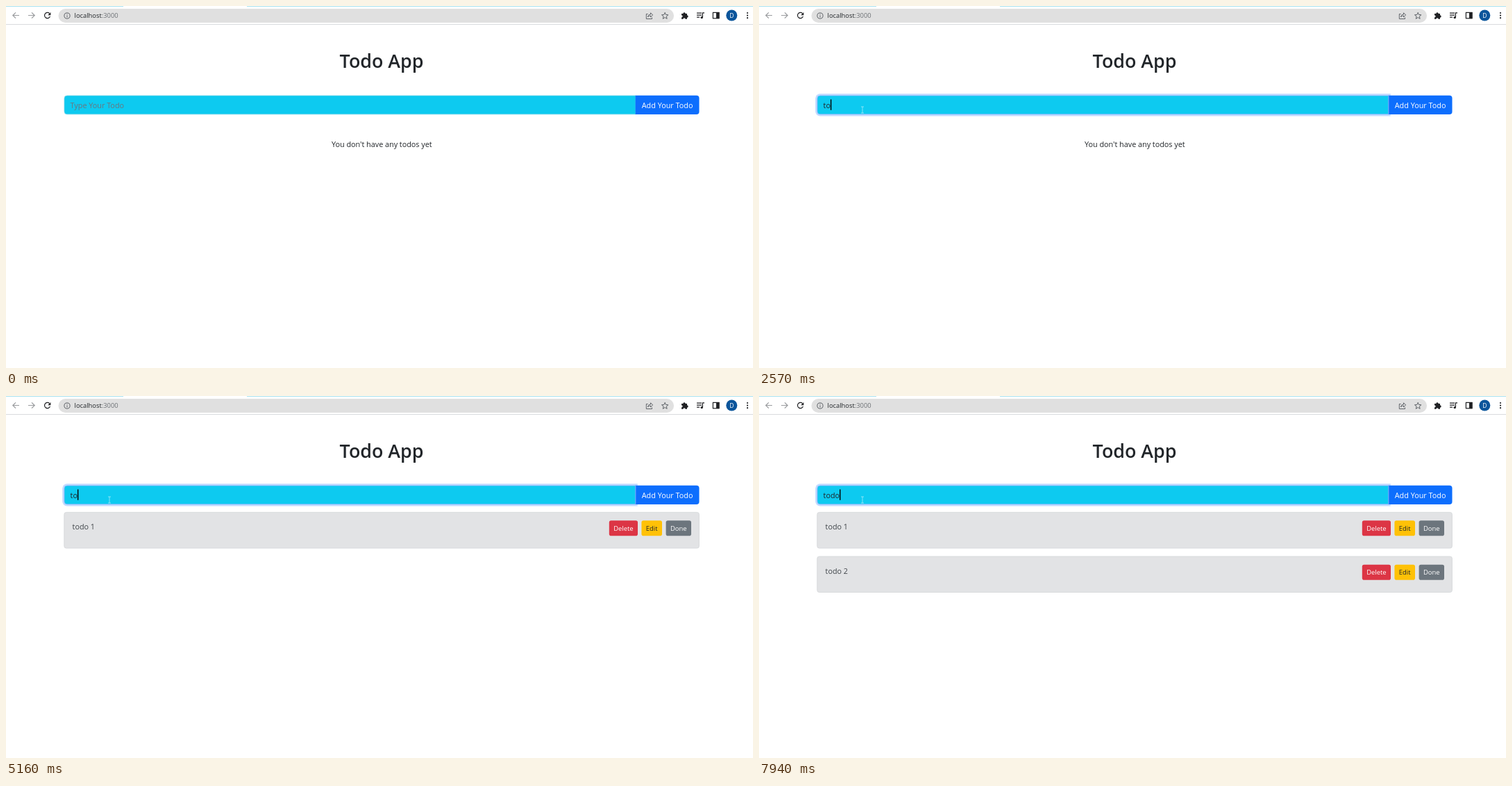
An HTML page for the animation above (8 s loop, 1076x521 px).

```html
<!DOCTYPE html>
<html lang="en">
<head>
<meta charset="utf-8">
<title>Todo App</title>
<style>
  html, body { margin: 0; width: 100%; height: 100%; overflow: hidden; background: #fff; }
  svg { display: block; width: 1076px; height: 521px; }
  text { font: 10.8px "Open Sans", "Noto Sans", sans-serif; fill: #212529; white-space: pre; }
  .mid { text-anchor: middle; }
  .title { font-size: 26.8px; font-weight: 600; }
  .url { font-size: 9.35px; }
  .small { font-size: 9.45px; }
  .white { fill: #fff; }
  .line { fill: none; stroke: #202124; stroke-width: 1.2; }
  .grey { stroke: #9a9c9f; }
  .thin { stroke: #5f6368; stroke-width: 1; }
</style>
</head>
<body>
<svg viewBox="0 0 1076 521">
  <!-- browser bar -->
  <path d="M0 0H169V1H0ZM347 0H1076V1H347Z" fill="#a9e2f1"/>
  <rect y="26" width="1076" height="1" fill="#d9dbde"/>
  <rect x="75.5" y="4" width="886.5" height="20" rx="10" fill="#e0e0e0"/>
  <path class="line grey" d="M19 13.5H10M14 9.3L9.8 13.5L14 17.7M32 13.5H41M37 9.3L41.2 13.5L37 17.7"/>
  <path class="line" stroke-width="1.4" d="M62.6 10.7A4.1 4.1 0 1 0 63.5 14.9"/>
  <path d="M64.4 9V13.2H60.2Z" fill="#202124"/>
  <circle class="line thin" cx="88" cy="14" r="4.1"/>
  <path class="line thin" d="M88 13.4V16.4M88 11.4V12.4"/>
  <text class="url" x="98.6" y="17.4">localhost<tspan fill="#6b6f74">:3000</tspan></text>
  <path class="line thin" d="M924.5 11.5H922.3V18.5H930.5V16.5M924.5 16C924.8 13.2 926.4 12 928.5 12V9.8L931.7 13L928.5 16V14C926.7 14 925.5 14.6 924.5 16Z"/>
  <path class="line thin" id="star"/>
  <path d="M973 11H975.3A1.7 1.7 0 0 1 978.7 11H981V13.3A1.7 1.7 0 0 1 981 16.7V18.8H978.6A1.6 1.6 0 0 0 975.4 18.8H973V16.4A1.6 1.6 0 0 0 973 13.2Z" fill="#202124"/>
  <path class="line" d="M995 10.2H1002M995 13.2H1002M995 16.2H999M1003.4 16.6V9.9H1006"/>
  <circle cx="1002.2" cy="16.6" r="1.7" fill="#202124"/>
  <rect class="line" x="1018.4" y="9.4" width="8.6" height="8.4"/>
  <rect x="1023" y="9" width="4.5" height="9" fill="#202124"/>
  <circle cx="1045.3" cy="13.5" r="8" fill="#0b559b"/>
  <text class="mid white" x="1045.3" y="16.6" style="font-size:8.5px">D</text>
  <g fill="#202124">
    <circle cx="1068" cy="10" r="1.1"/><circle cx="1068" cy="13.6" r="1.1"/><circle cx="1068" cy="17.2" r="1.1"/>
  </g>

  <!-- page -->
  <text class="mid title" x="541" y="89">Todo App</text>
  <path id="glow" fill="#0d6efd" fill-opacity=".25"/>
  <path id="field" fill="#0dcaf0" stroke-width=".8"/>
  <path d="M906.6 128.8H994.5A4 4 0 0 1 998.5 132.8V152A4 4 0 0 1 994.5 156H906.6Z" fill="#0d6efd"/>
  <rect id="edge" x="906.4" y="128.8" width=".9" height="27.2" fill="#86b7fe"/>
  <text class="mid white" x="952.6" y="147">Add Your Todo</text>
  <text id="entry" x="92.6" y="147"></text>
  <path id="wave" fill="none" stroke="#d3203c" stroke-width="1"/>
  <rect id="caret" y="134.4" width="1.4" height="15.4" fill="#000"/>
  <text id="empty" class="mid" x="541.3" y="203">You don't have any todos yet</text>
  <g id="list"></g>

  <!-- pointer -->
  <path id="arrow" d="M0 0V12.3L2.8 9.7L4.7 13.9L6.6 13L4.8 9H8.6Z" fill="#fff" stroke="#000" stroke-width=".7"/>
  <path id="beam" d="M-2 -4.5H2M0 -4.5V4.5M-2 4.5H2" fill="none" stroke="#c4f1fb" stroke-width=".8" opacity=".8"/>
</svg>
<script>
const LOOP = 8000;
const $ = id => document.getElementById(id);
const set = (el, attrs) => { for (const k in attrs) el.setAttribute(k, attrs[k]); };
const show = (el, on) => { el.style.display = on ? "" : "none"; };
const clamp = (v, lo, hi) => Math.max(lo, Math.min(hi, v));

// [time, text in the field, caret visible, number of todos]
const states = [
  [0, "", 0, 0], [1640, "", 1, 0], [2180, "", 0, 0],
  [2310, "t", 1, 0], [2570, "to", 1, 0], [2770, "tod", 1, 0], [2900, "todo", 1, 0],
  [3170, "todo ", 1, 0], [3570, "todo 1", 1, 0],
  [3980, "", 1, 1], [4120, "", 0, 1], [4630, "", 1, 1],
  [4830, "t", 1, 1], [5160, "to", 1, 1], [5270, "tod", 1, 1], [5380, "todo", 1, 1],
  [5830, "todo ", 1, 1], [6100, "todo 2", 1, 1],
  [6620, "", 0, 2], [7150, "", 1, 2],
  [7410, "t", 1, 2], [7680, "to", 1, 2], [7810, "tod", 1, 2], [7940, "todo", 1, 2]
];

// box with rounded corners on the left only, grown by s
function leftRound(s) {
  const x = 84 - s, y = 129 - s, r = 4 + s, right = 907 + s, bottom = 155.8 + s;
  return `M${right} ${y}H${x + r}A${r} ${r} 0 0 0 ${x} ${y + r}V${bottom - r}A${r} ${r} 0 0 0 ${x + r} ${bottom}H${right}Z`;
}

function button(x, w, label, fill, cls) {
  return `<rect x="${x}" y="179.2" width="${w}" height="22" rx="2.8" fill="${fill}"/>
    <text class="mid small ${cls}" x="${x + w / 2}" y="193.6">${label}</text>`;
}

function item(i) {
  return `<g transform="translate(0 ${i * 63.5})">
    <rect x="83.8" y="167.4" width="914.6" height="51.6" rx="3" fill="#e2e3e5" stroke="#d3d6d8" stroke-width=".8"/>
    <text x="95.6" y="192" style="fill:#41464b">todo ${i + 1}</text>
    ${button(868.8, 41.2, "Delete", "#dc3545", "white")}
    ${button(915.4, 29.6, "Edit", "#ffc107", "")}
    ${button(950.6, 36.4, "Done", "#6c757d", "white")}
  </g>`;
}

function starPath(cx, cy) {
  const pts = Array.from({ length: 10 }, (_, i) => {
    const r = i % 2 ? 2.2 : 5, a = i * Math.PI / 5;
    return `${cx + r * Math.sin(a)} ${cy - r * Math.cos(a)}`;
  });
  return "M" + pts.join("L") + "Z";
}

function wavePath() {
  let d = "M92.8 149.2";
  for (let i = 1; i <= 16; i++) d += `L${92.8 + i * 1.48} ${i % 2 ? 148.2 : 149.2}`;
  return d;
}

const bezier = (u, a, b, c, d) => {
  const v = 1 - u;
  return v * v * v * a + 3 * v * v * u * b + 3 * v * u * u * c + u * u * u * d;
};

function pointer(t) {
  if (t < 1040) {
    const u = 1 - (1 - clamp(Math.floor((t - 200) / 72), 0, 9) / 9) ** 1.4;
    return [bezier(u, 994, 700, 200, 136.5), bezier(u, 496, 120, 33, 164)];
  }
  const u = (clamp(Math.floor((t - 1040) / 75), 0, 7) + 1) / 8;
  return [136.5 + 12.5 * u, 164 - 14.5 * u];
}

function drawPointer(t) {
  const [x, y] = pointer(t);
  const inField = x > 84 && x < 907 && y > 129 && y < 156;
  show($("arrow"), t >= 200 && !inField);
  show($("beam"), t >= 200 && inField);
  set($(inField ? "beam" : "arrow"), { transform: `translate(${x} ${y})` });
}

function drawField(t, value, caret) {
  const focus = t < 1640 ? 0 : t < 1710 ? 0.15 : t < 1780 ? 0.65 : 1;
  const entry = $("entry");
  set($("glow"), { d: leftRound(2.8 * focus), "fill-opacity": 0.25 * focus });
  set($("field"), { stroke: focus > 0.5 ? "#86b7fe" : "#6fd3ea" });
  set($("edge"), { opacity: focus });
  entry.textContent = value || "Type Your Todo";
  entry.style.fill = value ? "#212529" : "#6c757d";
  show($("wave"), value.length > 4);
  show($("caret"), caret);
  set($("caret"), { x: 92.6 + (value ? entry.getComputedTextLength() : 0) });
}

let listed = -1;
function drawList(count) {
  if (count === listed) return;
  listed = count;
  $("list").innerHTML = Array.from({ length: count }, (_, i) => item(i)).join("");
  show($("empty"), !count);
}

function frame() {
  const t = performance.now() % LOOP;
  const [, value, caret, count] = states.filter(s => s[0] <= t).pop();
  drawField(t, value, caret);
  drawList(count);
  drawPointer(t);
  requestAnimationFrame(frame);
}

set($("star"), { d: starPath(949.2, 14.3) });
set($("field"), { d: leftRound(0) });
set($("wave"), { d: wavePath() });
frame();
</script>
</body>
</html>
```
